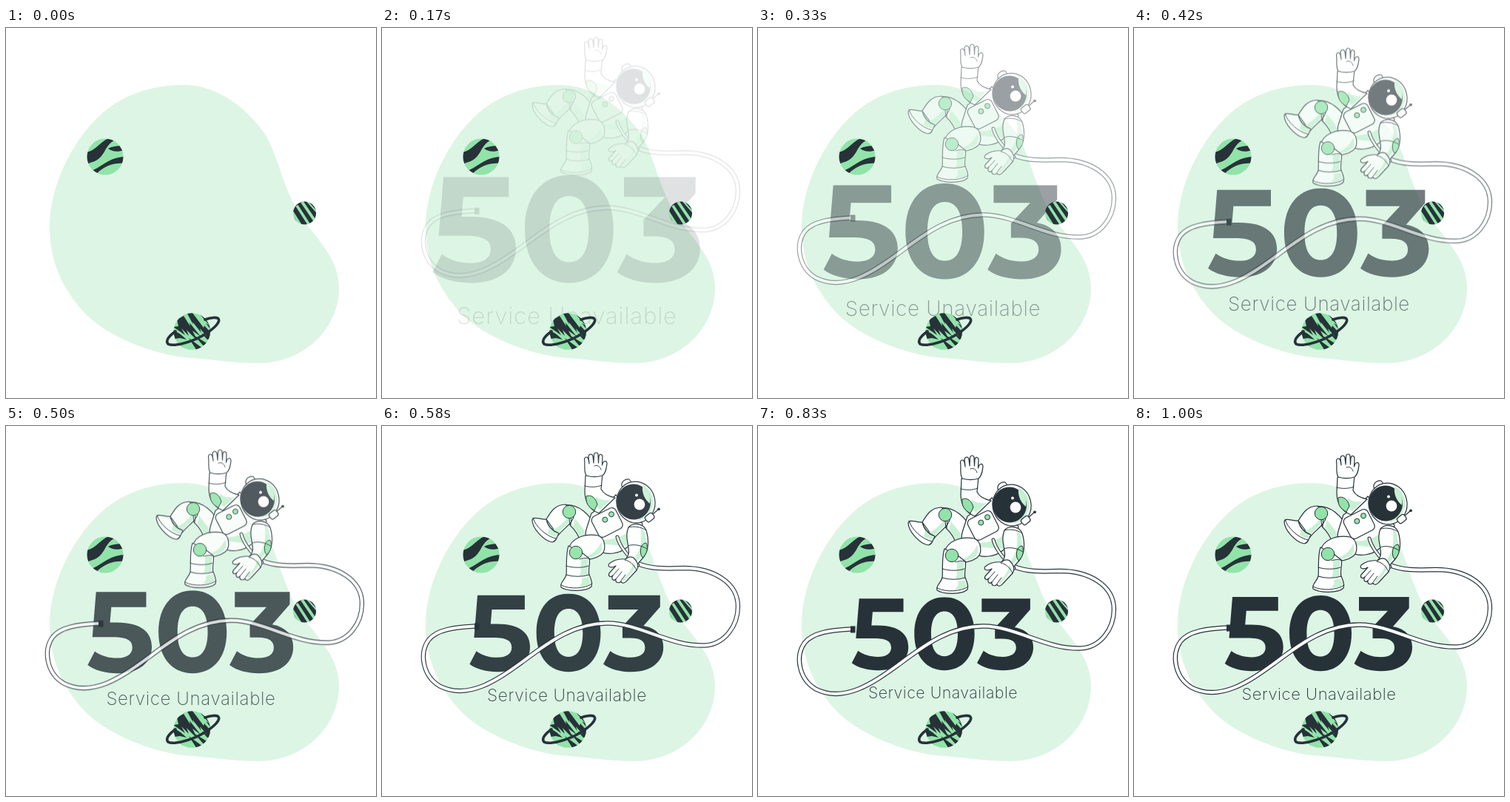
These frames come from a looping animation (500x500 px, 1040 ms). An HTML page:

```html
<!DOCTYPE html>
<html lang="en">
<head>
<meta charset="utf-8">
<title>503</title>
<style>
  html, body { margin: 0; width: 100%; height: 100%; overflow: hidden; background: #fff; }
  svg { display: block; width: 100vw; height: 100vh; }
  .dark { fill: #263238; }
  .green { fill: #92e3a9; }
  .pale { fill: #ddf5e5; }
  .shade { fill: #c8f1d4; }
  .white { fill: #fff; }
  .suit { fill: #fff; stroke: #263238; stroke-width: 1.2; stroke-linejoin: round; stroke-linecap: round; }
  .joint { fill: #92e3a9; stroke: #263238; stroke-width: 1; }
  .line { fill: none; stroke: #263238; stroke-linecap: round; stroke-linejoin: round; }
  .streak { fill: none; stroke: #92e3a9; }
  #message { transform-origin: 250px 300px; }
  text { font: 250 22px Inter, "Open Sans", sans-serif; letter-spacing: .55px; text-anchor: middle; }
</style>
</head>
<body>
<svg viewBox="0 0 500 500">
  <defs>
    <clipPath id="bandedClip"><circle cx="134" cy="174" r="24.5"/></clipPath>
    <clipPath id="smallClip"><circle cx="403.6" cy="250" r="15.5"/></clipPath>
    <clipPath id="ringedClip"><circle cx="251.3" cy="410" r="24.8"/></clipPath>
    <path id="hose" d="M126 272.5C98 274 74 277 63 291C50 309 55 340 78 353.5C118 374 160 342 192 319C228 292 262 268 305 268.5C350 269 388 300 436 298.5C463 297 481 272 481 246C481 213 447 194 408 194C382 195 362 195 346 188"/>
  </defs>

  <path class="pale" d="M240 77C283 77 322 104 349 142C366 168 371 204 392 244C400 261 421 280 437 307C446 322 450 337 450 352C450 404 405 453 340 453C310 453 280 448 240 445C200 440 142 420 108 387C78 355 59 318 59 268C59 215 88 155 125 120C155 91 195 77 240 77Z"/>

  <g id="message" class="dark">
    <g fill-rule="evenodd" role="img" aria-label="503">
      <path d="M133 231H194.8V249.7H151.8L150.2 268.5H158.5C189 268.5 201.7 281 201.7 298.5C201.7 316 188.5 331.2 159.5 331.2C145 331.2 131 327.5 122.7 321L131.5 304C139 309.5 148.5 312.4 159 312.4C170.5 312.4 177.7 307.7 177.7 299.5C177.7 291 172 286.5 153.5 286.5H128.5Z"/>
      <path d="M210 280.2C210 247.5 227.7 229 252 229C276.500 229 294 247.500 294 280.200C294 313 276.500 331.200 252 331.200C227.700 331.200 210 313 210 280.200ZM233.400 280.200C233.400 302.500 241 311.500 252 311.500C263 311.500 270.600 302.500 270.600 280.200C270.600 258 263 248.800 252 248.800C241 248.800 233.400 258 233.400 280.200Z"/>
      <path d="M304 231H371.7V246.3L350 271C367 274 376 284.5 376 299C376 315.5 363 331.2 334 331.2C320 331.2 306 327.8 297.5 321L306.5 303.8C313.3 309.2 323 312.3 333.7 312.3C345 312.3 352 307.7 352 299.5C352 291.3 346 287 332.8 287H322.5V271.5L343 249.7H304Z"/>
    </g>
    <text x="250" y="370">Service Unavailable</text>
  </g>

  <g clip-path="url(#bandedClip)">
    <rect class="green" x="109" y="149" width="50" height="50"/>
    <path class="dark" d="M108 168C122 166 126 154 139 149L146 152C133 159 134 174 120 180L108 184ZM115 193C130 188 138 175 160 174V183C146 182 134 186 122 197ZM138 163C143 160 150 159 160 159V165C151 168 143 167 138 163Z"/>
  </g>

  <g clip-path="url(#smallClip)">
    <rect class="dark" x="388" y="234" width="32" height="32"/>
    <path class="streak" stroke-width="3.6" d="M393 240L411 268M387 249L399 268"/>
    <path class="streak" stroke-width="4" d="M400 235L417 260"/>
    <path class="streak" stroke-width="2" d="M407 234L421 250"/>
  </g>

  <g clip-path="url(#ringedClip)">
    <rect class="green" x="226" y="385" width="51" height="50"/>
    <path class="dark" d="M231 394L240 389L249 403L248 398L263 417L252 409L259 423L244 408L247 416L237 406L242 415L226 404L233 403ZM244 384L252 385L267 405L268 402L277 412L275 421L262 406L264 412L252 397L253 401ZM262 387L275 402L270 399L277 408L274 394ZM225 407L236 414L244 421L235 419L228 420ZM247 419L266 433L258 436ZM255 416L273 427L268 431ZM232 426L244 436L236 432ZM264 412L278 421L272 421Z"/>
  </g>
  <path class="line" stroke-width="3.6" d="M229 410C219 417 215.500 423 219 427C226 431 250 425 267 415C282 406 290 397 287 393C285 390.500 277 391 269 394"/>

  <g id="astronaut">
    <use href="#hose" class="line" stroke-width="6.4"/>
    <use href="#hose" fill="none" stroke="#fff" stroke-width="4.1"/>
    <rect class="dark" x="125" y="268.5" width="6.5" height="9"/>

    <!-- far leg -->
    <path class="suit" d="M242 110C252 107 268 108 283 128L290 160L270 163C267 153 262 143 255 137Z"/>
    <path class="shade" d="M261 127L272 141L279 159L271 162C268 152 264 144 258 138Z"/>
    <path class="suit" d="M222 128C228 118 234 108 248 108L260 121C258 135 246 139 238 150Z"/>
    <path class="shade" d="M256 125C256 132 245 138 238 148L231 142C239 139 247 131 251 126Z"/>
    <path class="suit" d="M222 128C215 129 205 123 203 129C203 140 218 157 230 159C236 158 236 152 239 147C230 144 224 137 222 128Z"/>
    <path class="shade" d="M226 139C230 144 234 146 237 148L235 152C231 151 227 149 224 147Z"/>
    <path class="line" d="M204 126C207 137 221 151 235 154M253 127L254 136M256 126L255 136"/>
    <circle class="joint" cx="253" cy="118" r="8.7"/>

    <!-- torso -->
    <path class="suit" d="M283 120C295 112 309 103 316 95L352 134C350 151 343 161 331 166C322 174 304 178 292 170C279 163 273 152 276 142Z"/>
    <path class="shade" d="M279 149C292 158 310 158 327 149L345 138L349 141C347 151 340 159 330 164C322 163 300 164 279 155Z"/>

    <!-- near leg -->
    <path class="suit" d="M252 170C254 153 275 147 292 150C303 154 303 171 296 176C288 182 278 183 268 183Z"/>
    <path class="shade" d="M296 159C299 166 297 172 293 175C286 180 277 181 271 180C282 177 292 170 296 159Z"/>
    <path class="suit" d="M252 164C248 175 250 190 249 204C258 208 273 208 280 204C278 195 282 187 280 181L270 173Z"/>
    <path class="shade" d="M270 181L278 182C279 188 276 196 278 203L267 205C271 196 267 188 270 181Z"/>
    <path class="suit" d="M249 203C247 211 240 213 242 220C251 226 276 226 283 219C285 213 282 208 280 203C271 206 258 206 249 203Z"/>
    <path class="shade" d="M270 208L279 206C282 211 282 214 281 216C276 218 271 219 266 219C270 216 271 212 270 208Z"/>
    <path class="line" d="M242 217C253 223 275 222 284 215M249 191C258 194 271 194 279 191M267 182C272 180 278 180 281 182"/>
    <circle class="joint" cx="262" cy="173" r="8.7"/>

    <!-- chest pack -->
    <rect class="suit" x="286" y="117" width="36" height="31" rx="6" transform="rotate(-27 304 132)"/>
    <circle class="joint" cx="301.3" cy="128.6" r="3.5"/>
    <circle class="joint" cx="310" cy="121.3" r="3.5"/>

    <!-- tube -->
    <path class="line" stroke-width="5" d="M318 152C321 164 330 176 346 190"/>
    <path d="M318 152C321 164 330 176 346 190" fill="none" stroke="#fff" stroke-width="2.8" stroke-linecap="round"/>

    <!-- raised arm -->
    <path class="suit" d="M275 69L274 90C274 106 281 115 293 120L315 99C306 97 299 94 296 87L298 67Z"/>
    <path class="shade" d="M289 97C294 102 302 103 309 102L295 115C290 113 287 107 289 97Z"/>
    <path class="joint" d="M276 97C282 94 289 99 291 108L287 116C279 112 275 106 276 97Z"/>
    <path class="suit" d="M276 69C272 62 275 56 273.5 47C274 43 278 43 279 47L280 53L279 43C280 39 284 39 285 43L286 52L286.5 41C287 37 292 37 292 41L292.5 52L293 43C294 39 298 40 298 44L297.5 55C299 48 304 48 304 53C303 61 302 66 298 69C291 71 283 71 276 69Z"/>
    <path class="line" d="M274 83C281 85 290 85 297 82M287 56C291 54 295 57 296 61"/>

    <!-- helmet -->
    <path class="suit" d="M324 83C323 77 329 73 334 74L337 78L327 86Z"/>
    <ellipse class="suit" cx="343" cy="105" rx="26" ry="28" transform="rotate(-12 343 105)"/>
    <path class="shade" d="M350 80C362 86 368 96 366 109C363 121 355 128 344 131C357 121 364 106 358 91Z"/>
    <ellipse class="dark" cx="340" cy="104.5" rx="23" ry="24" transform="rotate(-8 340 104.5)"/>
    <path class="shade" d="M352 84C360 89 364 97 362 107C356 102 351 94 352 84Z"/>
    <circle class="white" cx="348" cy="108" r="7.4"/>
    <circle class="white" cx="344" cy="95.5" r="2"/>
    <path class="line" stroke-width="1.2" d="M365 122L373 115"/>
    <circle class="dark" cx="374" cy="114.3" r="1.9"/>
    <rect class="suit" x="356" y="121" width="12" height="9" rx="3" transform="rotate(-38 362 126)"/>

    <!-- lowered arm -->
    <path class="suit" d="M333 139C339 132 353 133 357 143C361 156 361 171 352 181L343 191L329 182C336 175 333 168 332 160C330 152 331 144 333 139Z"/>
    <path class="shade" d="M349 138C356 143 358 154 356 164C355 172 350 179 343 187L339 184C349 173 353 154 349 138Z"/>
    <path class="joint" d="M357 160C351 160 348 168 350 176L352 180C358 175 360 167 357 160Z"/>
    <path class="line" d="M332 164C340 161 350 163 358 168M333 139C340 137 350 138 357 143"/>
    <path class="suit" d="M329 182C320 181 312 184 307 188C304 192 309 195 316 191L307 201C305 205 309 207 312 204C309 209 313 212 316 209C315 214 320 215 323 212C324 216 329 214 331 211L344 197C348 191 346 186 340 180C336 178 332 179 329 182Z"/>
    <path class="shade" d="M339 186L343 190C341 197 334 204 327 212L325 209C333 202 339 194 339 186Z"/>
    <path class="line" d="M312 204L320 195M316 209L324 199M323 211L329 203M328 183C335 184 341 190 344 197"/>
  </g>
</svg>
<script>
  const LOOP = 1040, FRAME = 1000 / 24, LEAD = 34;
  const timing = { duration: 1000, fill: "both", easing: "cubic-bezier(.36, -.01, .5, 1.38)" };

  function enter(id, from, to) {
    const motion = document.getElementById(id).animate(
      [{ opacity: 0, transform: from }, { opacity: 1, transform: to }], timing);
    motion.pause();
    return motion;
  }

  const motions = [
    enter("message", "scale(1.5)", "scale(1)"),
    enter("astronaut", "translateY(-30px)", "translateY(0px)")
  ];
  const start = performance.now();

  // The entrance advances at 24 steps per second and stays hidden for the first two.
  function draw() {
    const time = (performance.now() - start) % LOOP;
    const step = Math.floor((time + 4) / FRAME);
    const at = step < 2 ? 0 : Math.min(step * FRAME + LEAD, 1000);
    for (const motion of motions) motion.currentTime = at;
    requestAnimationFrame(draw);
  }
  draw();
</script>
</body>
</html>
```
